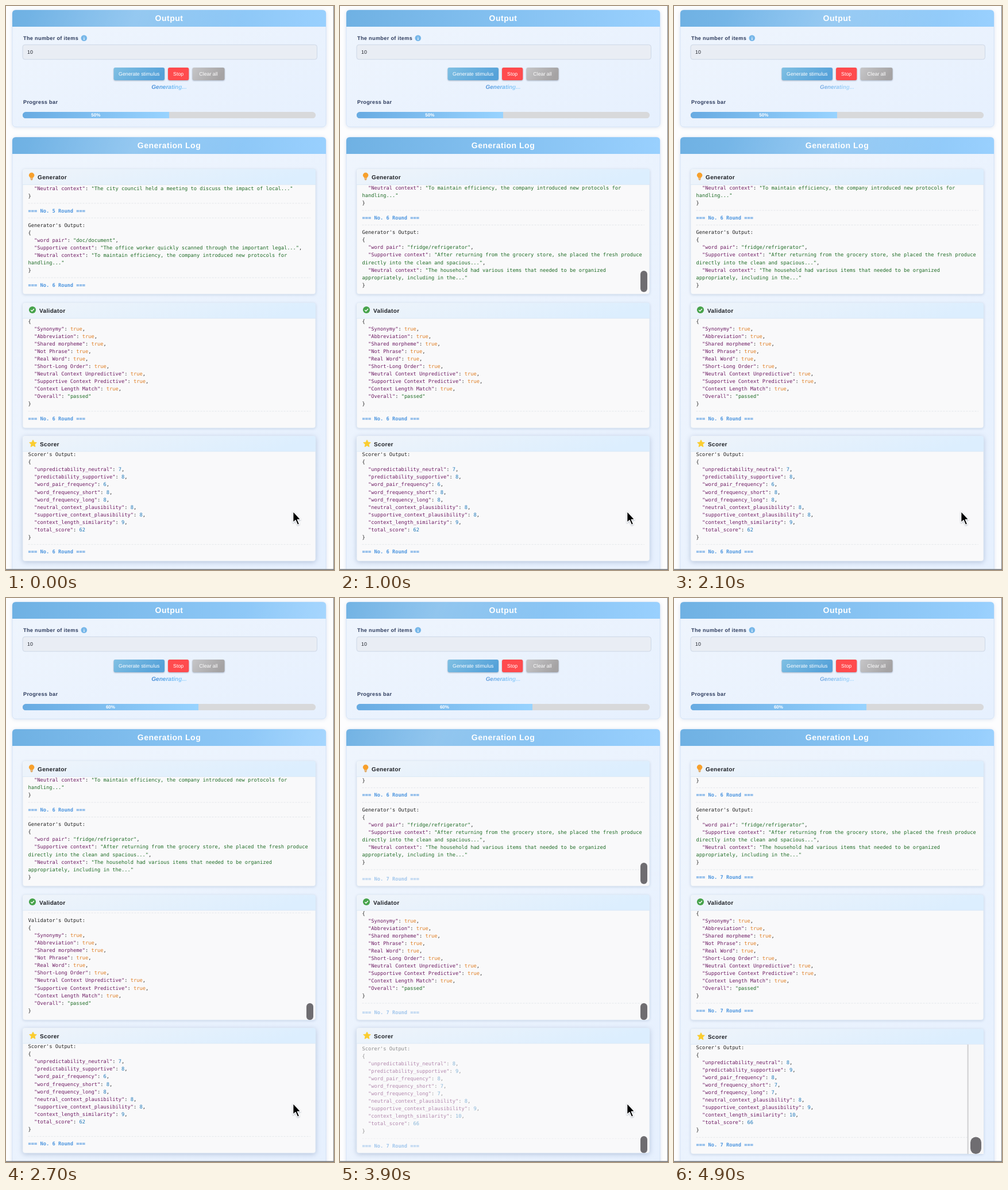
Recreate the animation shown at these times as an HTML page. Size 571 px wide and 980 px high, loop 5 s.

```html
<!DOCTYPE html>
<html lang="en">
<head>
<meta charset="utf-8">
<title>Generation log</title>
<style>
  html, body { margin: 0; width: 100%; height: 100%; overflow: hidden; background: #fdfdfe; }
  svg { display: block; width: 571px; height: 980px; }
  text { font-family: 'Liberation Sans', Arial, sans-serif; text-rendering: geometricPrecision; white-space: pre; }
  .title { font-size: 14px; font-weight: 700; letter-spacing: .5px; fill: #fff; text-anchor: middle; }
  .label { font-size: 9.1px; font-weight: 700; letter-spacing: .35px; fill: #2c3a5c; }
  .name { font-size: 10px; font-weight: 700; letter-spacing: .35px; fill: #1d1f24; }
  .button { font-size: 8.8px; fill: #fff; text-anchor: middle; }
  .percent { font-size: 8px; font-weight: 700; fill: #fff; text-anchor: middle; }
  .status { font-size: 10.1px; font-weight: 700; font-style: italic; text-anchor: middle; }
  .code { font-family: 'DejaVu Sans Mono', 'Liberation Mono', monospace; font-size: 8.71px; fill: #222; }
  .key { fill: #6d1a62; }
  .string { fill: #1f6c26; }
  .number { fill: #1c76b8; }
  .bool { fill: #df7d22; }
  .round { fill: #4a94df; font-weight: 700; }
  .panel { filter: drop-shadow(0 1px 3px rgba(90, 130, 190, .2)); }
  .card { filter: drop-shadow(0 1px 2px rgba(60, 90, 140, .2)); }
  .raised { filter: drop-shadow(0 2px 4px rgba(60, 90, 140, .28)); }
  .lift { filter: drop-shadow(0 1px 1.2px rgba(40, 60, 90, .35)); }
</style>
</head>
<body>
<script>
const LOOP = 5000, LINE = 13.08, GAP = 25.4, LEFT = 38.5, ADVANCE = 5.243, FADE = 400;
const NEXT_ROUND = 3700, LEAVE = 4350;

function el(parent, tag, attrs = {}, text) {
  const node = document.createElementNS('http://www.w3.org/2000/svg', tag);
  for (const k in attrs) node.setAttribute(k, attrs[k]);
  if (text !== undefined) node.textContent = text;
  parent.appendChild(node);
  return node;
}
const rect = (p, x, y, width, height, rx, fill, more) =>
  el(p, 'rect', { x, y, width, height, rx, fill, ...more });
const label = (p, cls, x, y, text, more) => el(p, 'text', { class: cls, x, y, ...more }, text);
const clamp = v => Math.max(0, Math.min(1, v));
const smooth = v => { v = clamp(v); return v * v * (3 - 2 * v); };

const svg = el(document.body, 'svg', { viewBox: '0 0 571 980' });
const defs = el(svg, 'defs');

function gradient(id, colors, y2 = 0) {
  const g = el(defs, 'linearGradient', { id, x1: 0, y1: 0, x2: 1, y2 });
  colors.forEach((c, i) => el(g, 'stop', { offset: i / (colors.length - 1), 'stop-color': c }));
  return `url(#${id})`;
}
function clip(id, d) {
  el(el(defs, 'clipPath', { id }), 'path', { d });
  return `url(#${id})`;
}
const topRounded = (x, y, w, h, r) =>
  `M${x} ${y + h}V${y + r}q0 ${-r} ${r} ${-r}h${w - 2 * r}q${r} 0 ${r} ${r}V${y + h}z`;

const headFill = gradient('head', ['#6fb1e3', '#99d0fe']);
const bodyFill = gradient('body', ['#eff5fd', '#e6f0fe'], 1);
const cardHead = gradient('cardHead', ['#eff4fa', '#dceefe'], .2);
const barFill = gradient('bar', ['#68abe2', '#98d3ff']);
const statusFill = gradient('status', ['#4388d4', '#5fb0f0', '#9bd6ff']);
const sheenFill = gradient('sheen', ['#fff0', '#ffffff2b', '#fff0']);

// Panels
const sheens = [];
function panel(y, h, title) {
  rect(svg, 11, y, 546, h, 6, bodyFill, { class: 'panel', stroke: '#d5e4f7', 'stroke-width': 1 });
  const d = topRounded(11, y, 546, 29, 6);
  el(svg, 'path', { d, fill: headFill });
  const g = el(svg, 'g', { 'clip-path': clip('head' + y, d) });
  sheens.push({ y, node: rect(g, -190, 0, 380, 29, 0, sheenFill) });
  label(svg, 'title', 284, y + 18.5, title);
}
panel(7, 203, 'Output');
panel(228, 780, 'Generation Log');

// Controls
label(svg, 'label', 30, 59.2, 'The number of items');
el(svg, 'circle', { cx: 135.8, cy: 55.8, r: 5.3, fill: '#77b7e9' });
label(svg, 'button', 135.8, 58.6, 'i', { style: 'font-size:8px;font-family:"Liberation Serif",serif;font-weight:700' });
rect(svg, 29, 67.3, 512.5, 25.5, 4, '#e9edf4', { stroke: '#cdd7e6' });
label(svg, 'button', 37, 83.2, '10', { style: 'fill:#23262e;text-anchor:start' });

function button(x, w, fill, text) {
  rect(svg, x, 107, w, 22, 3, fill, { class: 'lift' });
  label(svg, 'button', x + w / 2, 121.4, text);
}
button(187.5, 88.5, gradient('go', ['#80c0e3', '#56a2d9'], .3), 'Generate stimulus');
button(282, 36.3, '#ff4b4e', 'Stop');
button(324.5, 56, gradient('clear', ['#c6c6c8', '#a5a3a4'], .3), 'Clear all');
const status = el(svg, 'g');
label(status, 'status', 284, 143.8, 'Generating...', { fill: statusFill });

label(svg, 'label', 30, 170.3, 'Progress bar');
const barClip = clip('barClip', 'M34.5 184h499a5.6 5.6 0 0 1 0 11.3h-499a5.6 5.6 0 0 1 0-11.3z');
const bar = el(svg, 'g', { 'clip-path': barClip });
rect(bar, 28, 184, 512, 11.3, 0, '#d8d9db');
const fill = rect(bar, 28.8, 184, 255, 11.3, 0, barFill);
const percent = label(svg, 'percent', 156, 192.4, '50%');

// Log text
function codeLine(parent, source, y) {
  const body = source.trimStart();
  const x = LEFT + (source.length - body.length) * ADVANCE;
  const text = el(parent, 'text', { class: 'code', x, y: y + 3 });
  const add = (cls, s) => s && el(text, 'tspan', { class: cls }, s);
  const pair = body.match(/^("[^"]+")(: )(.*?)(,?)$/);
  if (pair) {
    const value = pair[3];
    add('key', pair[1]);
    add('', pair[2]);
    add(value === 'true' ? 'bool' : /^\d/.test(value) ? 'number' : 'string', value);
    add('', pair[4]);
  } else if (/^[a-z]/.test(body)) {
    add('string', body.replace(/,$/, ''));
    add('', body.endsWith(',') ? ',' : '');
  } else add(body.startsWith('=') ? 'round' : '', body);
}
const round = (n, at = -LOOP) => ({ at, lines: [`=== No. ${n} Round ===`] });
const output = (who, lines, at = -LOOP) =>
  ({ at, lines: [`${who}'s Output:`, '{', ...lines.map(s => '  ' + s), '}'] });

const checks = ['Synonymy', 'Abbreviation', 'Shared morpheme', 'Not Phrase', 'Real Word', 'Short-Long Order',
  'Neutral Context Unpredictive', 'Supportive Context Predictive', 'Context Length Match']
  .map(k => `"${k}": true,`).concat('"Overall": "passed"');
const metrics = ['unpredictability_neutral', 'predictability_supportive', 'word_pair_frequency',
  'word_frequency_short', 'word_frequency_long', 'neutral_context_plausibility',
  'supportive_context_plausibility', 'context_length_similarity', 'total_score'];
const scores = values => metrics.map((k, i) => `"${k}": ${values[i]}${i < 8 ? ',' : ''}`);

const doc = output('Generator', [
  '"word pair": "doc/document",',
  '"Supportive context": "The office worker quickly scanned through the important legal...",',
  '"Neutral context": "To maintain efficiency, the company introduced new protocols for']);
doc.lines.splice(5, 0, 'handling..."');
const fridge = output('Generator', [
  '"word pair": "fridge/refrigerator",',
  '"Supportive context": "After returning from the grocery store, she placed the fresh produce',
  '"Neutral context": "The household had various items that needed to be organized'], 560);
fridge.lines.splice(4, 0, 'directly into the clean and spacious...",');
fridge.lines.splice(6, 0, 'appropriately, including in the..."');
const council = { at: -LOOP, lines: [
  '  "Neutral context": "The city council held a meeting to discuss the impact of local..."', '}'] };

// A card keeps its newest entry at the bottom edge
function card(name, top, headH, bottomLine, thumbY, entries, icon, nameX) {
  const g = el(svg, 'g');
  const h = 217.5;
  const frame = rect(g, 29, top, 510, h, 4, '#f9f9fa', { class: 'card', stroke: '#dbe6f3', 'stroke-width': .8 });
  el(g, 'path', { d: topRounded(29, top, 510, headH, 4), fill: cardHead });
  rect(g, 29, top + headH - .4, 510, .8, 0, '#d6e5f5');
  icon(g);
  label(g, 'name', nameX, top + 17.5, name);
  const y0 = top + headH;
  const view = el(g, 'g', { 'clip-path': clip(name, `M29 ${y0}h510V${top + h}H29z`) });
  const stack = el(view, 'g');
  let y = 0;
  entries.forEach((e, i) => {
    if (i) y += GAP;
    e.node = el(stack, 'g');
    if (i) e.rule = el(e.at === entries[i - 1].at ? e.node : stack, 'path', {
      d: `M${LEFT} ${y - GAP / 2}H530`, stroke: '#dfe2e6', 'stroke-width': .8, 'stroke-dasharray': '3 2' });
    e.lines.forEach((s, j) => { if (j) y += LINE; codeLine(e.node, s, y); });
    e.last = y;
  });
  const track = el(view, 'g');
  rect(track, 511, y0, 28, 200, 0, '#f7f7f8');
  rect(track, 510.6, y0, 2, 200, 0, '#cfcfd1');
  const thumb = rect(view, 523, thumbY, 12, Math.min(37, top + h - thumbY), 6, '#6f6d71');
  return { g, frame, entries, stack, bottomLine, track, thumb };
}

const bulb = g => {
  el(g, 'path', { d: 'M42.3 299c0-1.6-2.5-2.3-2.5-4.7a4.8 4.8 0 0 1 9.6 0c0 2.4-2.5 3.1-2.5 4.7z', fill: '#f7a02c' });
  el(g, 'path', { d: 'M42.4 300.4h4.4M43.2 302h2.8', stroke: '#d98b2b', 'stroke-width': 1.2 });
};
const tick = g => {
  el(g, 'circle', { cx: 46, cy: 528, r: 6.1, fill: '#47a34b' });
  el(g, 'path', { d: 'M43.2 528.2l2 2 3.7-4', fill: 'none', stroke: '#fff', 'stroke-width': 1.4 });
};
const star = g => {
  const points = Array.from({ length: 10 }, (_, i) => {
    const r = i % 2 ? 3.1 : 6.6, a = i * Math.PI / 5;
    return `${47 + r * Math.sin(a)},${760.6 - r * Math.cos(a)}`;
  });
  el(g, 'polygon', { points: points.join(' '), fill: '#fbcd2f', stroke: '#fbcd2f', 'stroke-linejoin': 'round' });
};

const cards = [
  card('Generator', 283.3, 27, 484.8, 460,
    [council, round(5), doc, round(6), fridge, round(7, NEXT_ROUND)], bulb, 55),
  card('Validator', 515.8, 27, 716.8, 704,
    [output('Validator', checks), round(6), output('Validator', checks, 2250), round(7, NEXT_ROUND)], tick, 58),
  card('Scorer', 747, 27, 948.4, 935,
    [output('Scorer', scores([7, 8, 6, 8, 8, 8, 8, 9, 62])), round(6),
      output('Scorer', scores([8, 9, 8, 7, 7, 8, 9, 10, 66]), NEXT_ROUND), round(7, NEXT_ROUND)], star, 59)
];
const scorer = cards[2];

// Window edges and pointer
rect(svg, 569.8, 0, 1.2, 980, 0, '#8c8d90');
rect(svg, 0, 978.4, 571, 1.6, 0, '#77797d');
const pointer = el(svg, 'path', {
  d: 'M0 0V19.6L4.4 15.6 7.8 23.6 11 22.2 7.6 14.4H13.2z', fill: '#000', stroke: '#fff',
  'stroke-width': 1.3, 'stroke-linejoin': 'round', class: 'lift' });

function drawCard(c, t) {
  let last;
  for (const e of c.entries) {
    const shown = t >= e.at, p = smooth((t - e.at) / FADE);
    e.node.style.display = shown ? '' : 'none';
    if (e.rule) e.rule.style.display = shown ? '' : 'none';
    e.node.setAttribute('opacity', p);
    e.node.setAttribute('transform', `translate(0 ${7 * (1 - p)})`);
    if (shown) last = e;
  }
  c.stack.setAttribute('transform', `translate(0 ${c.bottomLine - last.last})`);
  const hovered = c === scorer && t >= LEAVE;
  const age = t - last.at;
  c.thumb.setAttribute('opacity', hovered ? 1 : 1 - clamp((age - 650) / 250));
  c.thumb.setAttribute('x', hovered ? 516 : 523);
  c.thumb.setAttribute('width', hovered ? 19 : 12);
  c.thumb.setAttribute('rx', hovered ? 9.5 : 6);
  c.track.style.display = hovered ? '' : 'none';
}

function draw(t) {
  const sweep = (t / 2000 + .45) % 1;
  const sheenX = 11 + 546 * (2 * sweep - .5);
  for (const s of sheens) s.node.setAttribute('transform', `translate(${sheenX} ${s.y}) skewX(-20)`);

  const pulse = .5 + .5 * Math.cos((t + 200) / 1500 * 2 * Math.PI);
  const k = .97 + .03 * pulse;
  status.setAttribute('opacity', .66 + .34 * pulse);
  status.setAttribute('transform', `translate(284 140.5) scale(${k}) translate(-284 -140.5)`);

  const done = .5 + .1 * smooth((t - 2250) / 350);
  fill.setAttribute('width', 510.3 * done);
  percent.setAttribute('x', 28.8 + 510.3 * done / 2);
  percent.textContent = t < 2250 ? '50%' : '60%';

  cards.forEach(c => drawCard(c, t));
  const drop = smooth((t - LEAVE) / 250);
  scorer.g.setAttribute('transform', `translate(0 ${1.5 * drop})`);
  scorer.frame.setAttribute('class', drop < .5 ? 'raised' : 'card');

  const away = clamp((t - LEAVE + 100) / 300);
  pointer.setAttribute('transform', `translate(${499.7 + 80 * away * away} 878)`);
}

const start = performance.now();
function tickFrame() {
  draw((performance.now() - start) % LOOP);
  requestAnimationFrame(tickFrame);
}
tickFrame();
</script>
</body>
</html>
```
